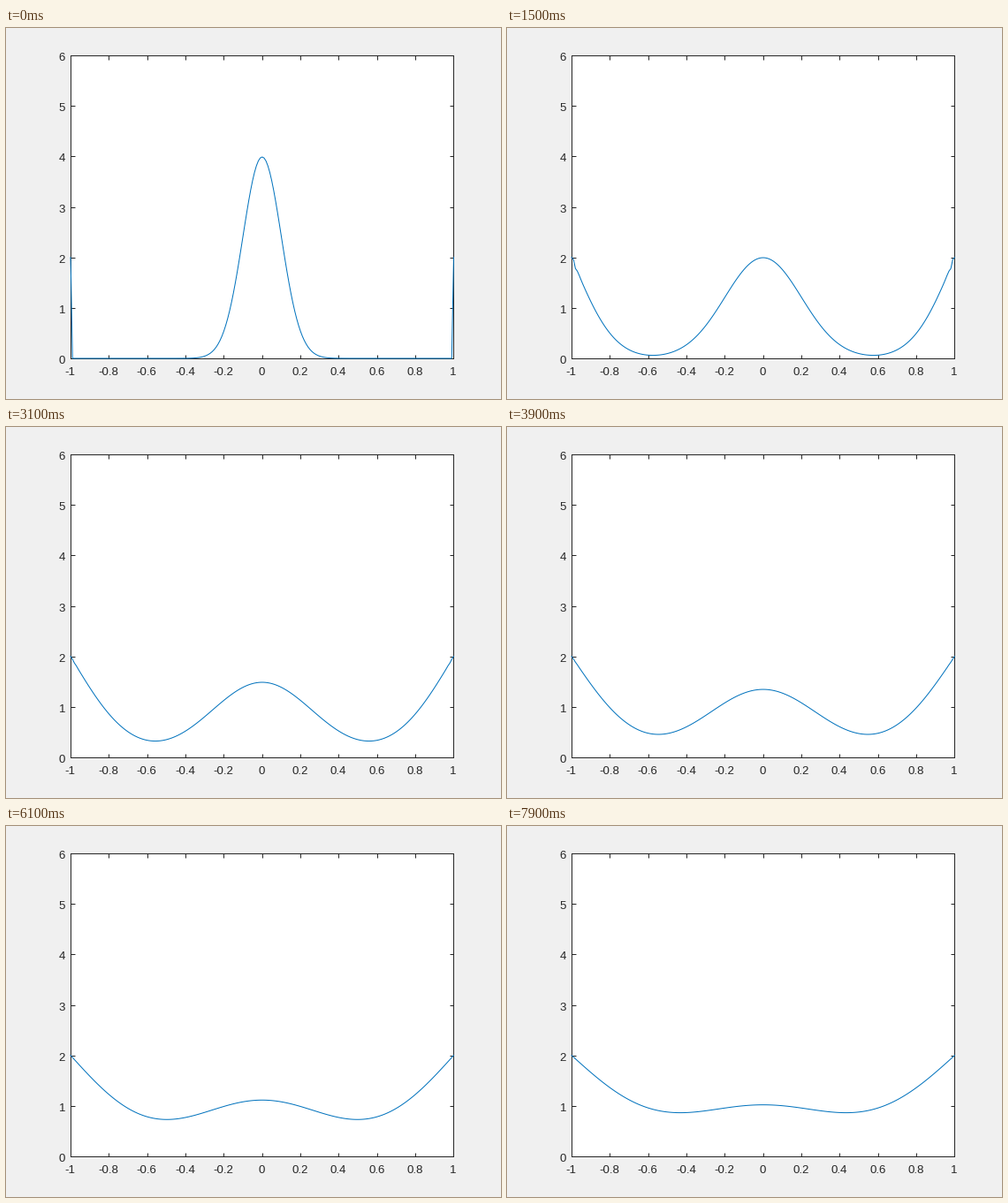
A matplotlib script that plays this animation: 560x420 px, repeating every 8 s.

```python
import numpy as np
import matplotlib.pyplot as plt
from matplotlib.animation import FuncAnimation

W, H, DPI = 560, 420, 100
PX = 72 / DPI  # points per pixel
LEFT, RIGHT, TOP, BOTTOM = 73.1, 506.45, 31.1, 374
INK = "#262626"
FRAMES, INTERVAL = 80, 100

plt.rcParams["font.family"] = "Liberation Sans"
plt.rcParams["path.simplify"] = False


def diffuse(n=201, spread=0.001, edge=2.0, sigma=0.1):
    """Crank-Nicolson heat flow of a narrow bell with fixed ends."""
    x = np.linspace(-1, 1, n)
    r = spread / (x[1] - x[0]) ** 2
    lap = np.diag(np.full(n, -2.0)) + np.eye(n, k=1) + np.eye(n, k=-1)
    lap[[0, -1]] = 0
    eye = np.eye(n)
    step = np.linalg.solve(eye - r / 2 * lap, eye + r / 2 * lap)

    u = np.exp(-x**2 / (2 * sigma**2)) / (sigma * np.sqrt(2 * np.pi))
    u[[0, -1]] = edge
    states = [u]
    for _ in range(FRAMES - 1):
        states.append(step @ states[-1])
    return x, states


x, states = diffuse()

fig = plt.figure(figsize=(W / DPI, H / DPI), dpi=DPI, facecolor="#f0f0f0")
ax = fig.add_axes([LEFT / W, 1 - BOTTOM / H, (RIGHT - LEFT) / W, (BOTTOM - TOP) / H])
ax.set(xlim=(-1, 1), ylim=(0, 6))
xticks = np.arange(-5, 6) / 5
yticks = np.arange(7)
ax.set_xticks(xticks)
ax.set_yticks(yticks)
ax.tick_params(direction="in", length=4.5 * PX, width=PX, color=INK,
               top=True, right=True, labelbottom=False, labelleft=False)
for spine in ax.spines.values():
    spine.set(linewidth=PX, edgecolor=INK)


def label(px, py, value, align):
    fig.text(px / W, 1 - py / H, f"{value:g}", ha=align, va="baseline",
             fontsize=13.2 * PX, color=INK)


for v in xticks:
    label(LEFT - 0.5 + (v + 1) / 2 * (RIGHT - LEFT), 393, v, "center")
for v in yticks:
    label(67, BOTTOM - v / 6 * (BOTTOM - TOP) + 6, v, "right")

line, = ax.plot(x, states[0], color="#0072bd", lw=PX, clip_on=False, zorder=5)


def draw(i):
    line.set_ydata(states[i])
    return (line,)


anim = FuncAnimation(fig, draw, frames=FRAMES, interval=INTERVAL, repeat=True)
plt.show()
```
